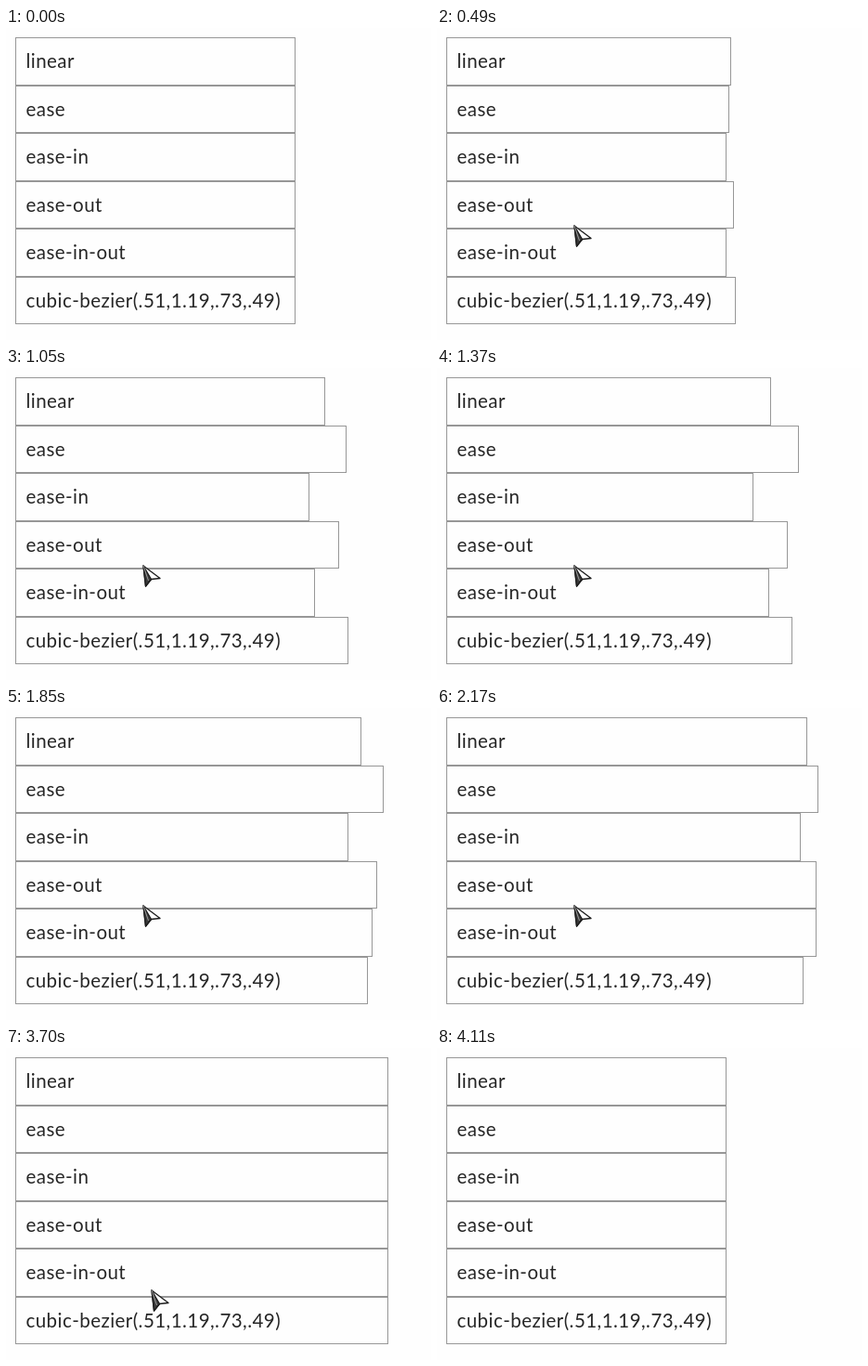
These frames come from a looping animation (458x336 px, 6600 ms). An HTML page:

```html
<!DOCTYPE html>
<html lang="en">
<head>
<meta charset="utf-8">
<style>
  html, body { margin: 0; width: 100%; height: 100%; overflow: hidden; background: #fefefe; }
  .row {
    position: absolute; left: 10px; box-sizing: border-box; height: 51.5px;
    padding-left: 10.5px; border: 1px solid #979797; white-space: nowrap;
    font: 20.5px/49.6px Lato, sans-serif; font-kerning: none;
    letter-spacing: .45px; color: #262626;
  }
  #cursor { position: absolute; left: 0; top: 0; overflow: visible; }
</style>
</head>
<body>
<svg id="cursor" width="20" height="24" stroke="#1c1c1c" stroke-width="1.3" stroke-linejoin="round">
  <path d="M0 0L18 13.5L8.5 14.5L2.5 22Z" fill="#fff"/>
  <path d="M0 0L8.5 14.5L2.5 22Z" fill="#3a3a3a"/>
  <path d="M0 0L5.5 16" stroke="#ddd" stroke-width=".6"/>
</svg>
<script>
const LOOP = 6600, STEP = 80, ENTER = 410, LEAVE = 3700, GONE = 4110;
const START = 397, DURATION = 2035;
const easings = [
  ['linear', 0, 0, 1, 1],
  ['ease', .25, .1, .25, 1],
  ['ease-in', .42, 0, 1, 1],
  ['ease-out', 0, 0, .58, 1],
  ['ease-in-out', .42, 0, .58, 1],
  ['cubic-bezier(.51,1.19,.73,.49)', .51, 1.19, .73, .49],
];
const cursor = document.getElementById('cursor');

const rows = easings.map(([name], i) => {
  const row = document.createElement('div');
  row.className = 'row';
  row.textContent = name;
  row.style.top = 10 + i * 51.5 + 'px';
  cursor.before(row);
  return row;
});

const curve = (a, b, u) => 3 * a * u * (1 - u) ** 2 + 3 * b * u * u * (1 - u) + u ** 3;

function bezier(x1, y1, x2, y2, x) {
  if (x <= 0 || x >= 1) return x <= 0 ? 0 : 1;
  let lo = 0, hi = 1;
  for (let i = 0; i < 24; i++) {
    const mid = (lo + hi) / 2;
    if (curve(x1, x2, mid) < x) lo = mid; else hi = mid;
  }
  return curve(y1, y2, lo);
}

const snap = (t, from) => from + Math.floor((t - from) / STEP) * STEP;

// The pointer rests on the list, then slows down while leaving at the bottom.
function pointer(t) {
  if (t < ENTER || t >= GONE) return null;
  if (t < LEAVE) return [148, 213];
  const k = Math.min(4, (snap(t, LEAVE) - LEAVE) / STEP);
  return [157 + 2 * k, 261 + 28.5 * k - 3 * k * k];
}

function draw(now) {
  const t = now % LOOP;
  const tip = pointer(t);
  const hover = tip && tip[1] < 319;
  const p = hover ? (snap(t, ENTER) - START) / DURATION : 0;
  rows.forEach((row, i) => {
    row.style.width = 302 + 100 * bezier(...easings[i].slice(1), p) + 'px';
  });
  cursor.style.display = tip ? '' : 'none';
  if (tip) cursor.style.transform = `translate(${tip[0]}px, ${tip[1]}px)`;
}

const origin = performance.now();
function tick() {
  draw(performance.now() - origin);
  requestAnimationFrame(tick);
}
tick();
</script>
</body>
</html>
```
